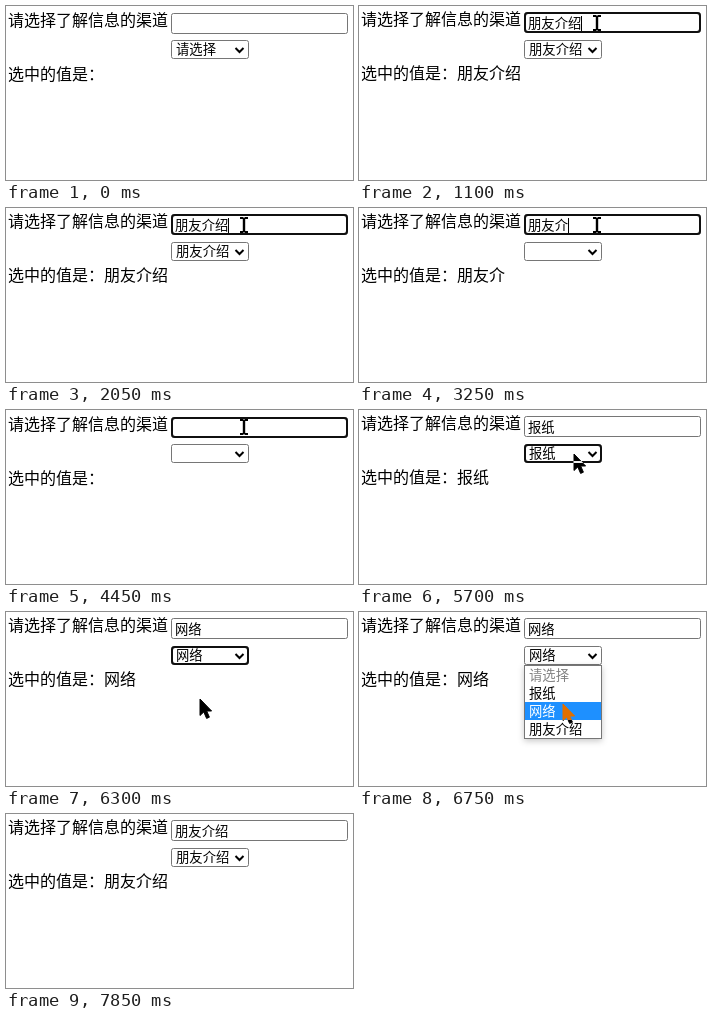
An HTML page that plays this animation: 347 by 174 pixels, repeating every 7.9 s.

```html
<!DOCTYPE html>
<html lang="zh-CN">
<head>
<meta charset="utf-8">
<title>信息渠道</title>
<style>
html, body { margin: 0; width: 100%; height: 100%; overflow: hidden; background: #fff; }
svg { display: block; isolation: isolate; }
text { font-family: "Noto Sans CJK SC", "Noto Sans CJK", sans-serif; font-size: 13.333px; }
.big { font-size: 16px; }
.box { fill: #fff; stroke: #767676; }
.ring { fill: none; stroke: #101010; stroke-width: 2; }
#menu { filter: drop-shadow(0 2px 3px rgba(0, 0, 0, .22)); }
#pointer { mix-blend-mode: difference; fill: #fff; }
#arrow { stroke: #fff; }
</style>
</head>
<body>
<svg width="347" height="174" viewBox="0 0 347 174">
  <rect width="347" height="174" fill="#fff"/>
  <text id="label" class="big" x="2">请选择了解信息的渠道</text>
  <text id="result" class="big" x="2"></text>

  <g id="field">
    <rect class="box" x="165.5" y="7.5" width="176" height="20" rx="2"/>
    <rect id="inputRing" class="ring" x="166" y="8" width="175" height="19" rx="3"/>
  </g>
  <text id="input" x="169" y="22"></text>
  <rect id="caret" y="10" width="1" height="15"/>

  <rect class="box" x="165.5" y="34.5" width="77" height="18" rx="2"/>
  <rect id="selectRing" class="ring" x="166" y="35" width="76" height="17" rx="3"/>
  <text id="choice" x="170" y="48"></text>
  <path d="M229.5 42l4 4 4-4" fill="none" stroke="#000" stroke-width="2"/>

  <g id="menu">
    <rect class="box" x="165.5" y="53.5" width="77" height="73"/>
    <rect id="mark" x="166" width="76" height="18" fill="#1e90ff"/>
  </g>

  <g id="pointer">
    <path id="arrow" d="M0 0V16.5L3.8 13L6.6 19.4L9.4 18.2L6.7 12H11.6Z"/>
    <path id="beam" d="M-4 -8H-1L0 -7L1 -8H4V-6H1.2V6H4V8H1L0 7L-1 8H-4V6H-1.2V-6H-4Z"/>
  </g>
</svg>
<script>
const LOOP = 7900, STEP = 50, EM = 40 / 3;
const OPTIONS = ['请选择', '报纸', '网络', '朋友介绍'];
const TYPED = OPTIONS[3];
const FOCUS_INPUT = 450, PASTE = 1100, FOCUS_SELECT = 4650, BLUR = 7850;
const ERASE = [3150, 3450, 3800, 3850];
const PICKS = [
  { open: 4700, close: 5350, option: 1 },
  { open: 5800, close: 6300, option: 2 },
  { open: 6550, close: 7150, option: 3 }
];
const ENTER = [347, 20];
// Pointer moves: start, end, then where it arrives
const MOVES = [
  [0, 200, 238, 17],
  [4450, 4750, 216, 45],
  [4950, 5150, 213, 82],
  [5350, 5700, 215, 44],
  [5850, 6150, 191, 98],
  [6275, 6500, 203, 45],
  [6560, 7000, 204, 115],
  [7200, 7550, 347, 92]
];

const $ = id => document.getElementById(id);
const show = (el, on) => el.setAttribute('display', on ? 'inline' : 'none');
const progress = (t, a, b) => Math.min(1, Math.max(0, (t - a) / (b - a)));
const easeOut = p => 1 - (1 - p) ** 2;

function valueAt(t) {
  const pick = PICKS.filter(p => p.close <= t).pop();
  if (pick) return OPTIONS[pick.option];
  if (t < PASTE) return '';
  return TYPED.slice(0, TYPED.length - ERASE.filter(e => e <= t).length);
}

// Solid just after an edit, blinking while idle
function caretAt(t) {
  const edited = [PASTE, ...ERASE].some(e => t >= e && t < e + 200);
  return edited || (t < ERASE[0] && t % 800 >= 400) || (t < ERASE[0] && t % 800 === 0);
}

function pointerAt(t) {
  let [x, y] = ENTER;
  for (const [a, b, toX, toY] of MOVES) {
    const p = easeOut(progress(t, a, b));
    x += (toX - x) * p;
    y += (toY - y) * p;
  }
  // A short dip over the list and back
  const dip = Math.sin(Math.PI * progress(t, 1500, 2050));
  return [Math.round(x - 11 * dip), Math.round(y + 45 * dip)];
}

const rows = OPTIONS.map((name, i) => {
  const row = document.createElementNS('http://www.w3.org/2000/svg', 'text');
  row.setAttribute('x', 170);
  row.setAttribute('y', 68 + 18 * i);
  row.textContent = name;
  $('menu').append(row);
  return row;
});

function drawMenu(value, y) {
  const hover = Math.floor((y - 54) / 18);
  const active = hover > 0 && hover < 4 ? hover : OPTIONS.indexOf(value);
  show($('mark'), active > 0);
  $('mark').setAttribute('y', 54 + 18 * active);
  rows.forEach((row, i) =>
    row.setAttribute('fill', i === active ? '#fff' : i ? '#000' : '#808080'));
}

function draw(t) {
  const value = valueAt(t), [x, y] = pointerAt(t);
  const open = PICKS.some(p => t >= p.open && t < p.close);
  const inInput = t >= FOCUS_INPUT && t < FOCUS_SELECT;
  const inSelect = t >= FOCUS_SELECT && t < BLUR;
  const lift = value ? 1 : 0;

  $('label').setAttribute('y', 20 - lift);
  $('result').setAttribute('y', 74 - lift);
  $('field').setAttribute('transform', `translate(0 ${-lift})`);
  $('result').textContent = '选中的值是：' + value;
  $('input').textContent = value;
  $('choice').textContent = t < PASTE ? OPTIONS[0] : OPTIONS.includes(value) ? value : '';

  show($('inputRing'), inInput);
  show($('selectRing'), inSelect && !open);
  show($('caret'), inInput && caretAt(t));
  $('caret').setAttribute('x', Math.floor(169.1 + EM * value.length));

  show($('menu'), open);
  if (open) drawMenu(value, y);

  const typing = x >= 165 && x < 342 && y >= 7 && y < 28;
  show($('beam'), typing);
  show($('arrow'), !typing);
  show($('pointer'), t > 0 && t < 7550);
  $('pointer').setAttribute('transform', `translate(${x} ${y})`);
}

const start = performance.now();
function tick() {
  const t = (performance.now() - start) % LOOP;
  draw(Math.floor(t / STEP) * STEP);
  requestAnimationFrame(tick);
}
tick();
</script>
</body>
</html>
```
